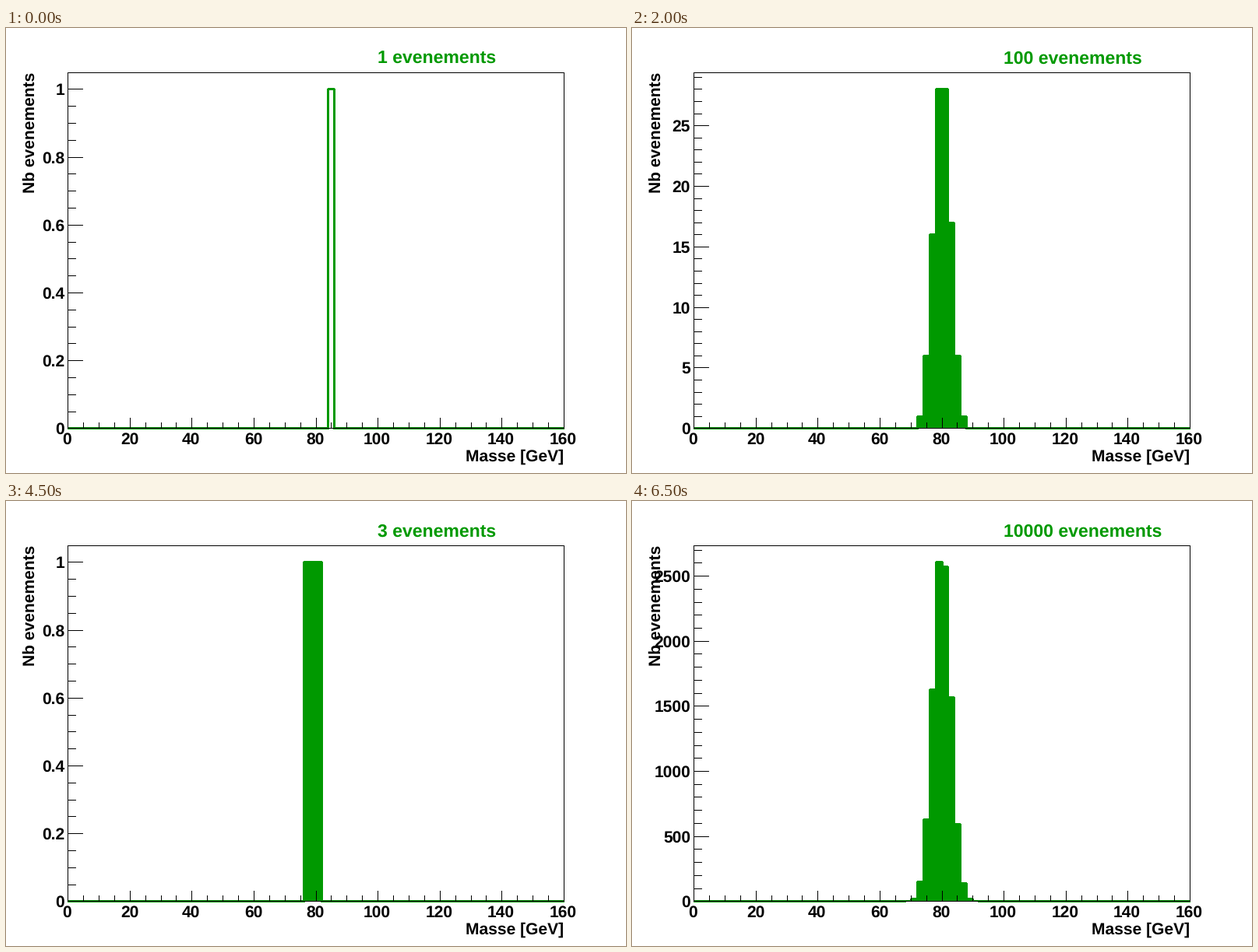
Recreate the animation shown at these times as a matplotlib script. Size 796 px wide and 572 px high, loop 7100 ms.

```python
import math

import matplotlib
import matplotlib.pyplot as plt
from matplotlib.animation import FuncAnimation
from matplotlib.collections import PolyCollection

matplotlib.rcParams["toolbar"] = "None"
matplotlib.rcParams["text.hinting"] = "no_hinting"

W, H, DPI = 796, 572, 100
X0, Y0 = 0.1 * W, 0.9 * H
PLOT_W, PLOT_H = 0.8 * W, 0.8 * H
LEFT, RIGHT, TOP, BOTTOM = 79, 716, 57, 514
X_MAX, BIN = 160, 2
GREEN = "#009900"
TICK_MS, HOLD = 100, 5
TOTALS = [1, 2, 3, 10, 100, 1000, 10000]

# Each run: its first three masses, then (peak, mean, sigma) as events pile up.
RUNS = [
    ((85, 77, 79), [(3, 80, 2.5), (28, 80.05, 2.8),
                    (268, 80.03, 2.88), (2660, 80.03, 2.88)]),
    ((79, 81, 77), [(4, 80.4, 2.0), (33, 80.5, 2.3),
                    (261, 80, 2.88), (2605, 79.95, 2.88)]),
]
CENTERS = range(BIN // 2, X_MAX, BIN)


def bell(peak, mean, sigma):
    g = [math.exp(-((c - mean) / sigma) ** 2 / 2) for c in CENTERS]
    return [round(peak * v / max(g)) for v in g]


def histograms():
    for masses, bells in RUNS:
        for n in range(1, len(masses) + 1):
            yield [masses[:n].count(c) for c in CENTERS]
        for params in bells:
            yield bell(*params)


STEPS = list(histograms())

fig = plt.figure(figsize=(W / DPI, H / DPI), dpi=DPI, facecolor="white")
ax = fig.add_axes([0, 0, 1, 1])
ax.set_xlim(0, W)
ax.set_ylim(H, 0)
ax.axis("off")


def rect(x0, y0, x1, y1):
    return [(x0, y0), (x1, y0), (x1, y1), (x0, y1)]


def layer(color, z, verts=()):
    coll = PolyCollection(list(verts), facecolors=color, edgecolors="none",
                          linewidths=0, antialiaseds=False, zorder=z)
    ax.add_collection(coll, autolim=False)
    return coll


def label(x, y, s="", size=21, color="black", **kw):
    return ax.text(x, y, s, family="Liberation Sans", weight="bold",
                   size=size * 72 / DPI, color=color, va="baseline",
                   zorder=5, **kw)


def px(v):
    return math.floor(X0 + v * PLOT_W / X_MAX + 1e-6)


def py(v, top):
    return math.floor(Y0 - v * PLOT_H / top + 1e-6)


def axis_step(top):
    """Smallest round step giving at most ten divisions, and its subdivisions."""
    power = 10.0 ** (math.floor(math.log10(top)) - 1)
    while True:
        for lead, parts in ((1, 5), (2, 4), (5, 5)):
            if top / (lead * power) <= 10:
                return lead * power, parts
        power *= 10


def y_axis(top):
    step, parts = axis_step(top)
    lines, marks = [], []
    for i in range(int(top / step * parts + 1e-9) + 1):
        v = i * step / parts
        y = py(v, top)
        major = i % parts == 0
        lines.append(rect(LEFT, y, LEFT + (20 if major else 11), y + 1))
        if major:
            marks.append((y, f"{v:g}"))
    return lines, marks


def outline(counts, top):
    """Bars, plus the thick zero line across the empty bins."""
    full, inner = [], []
    for c, n in zip(CENTERS, counts):
        a, b = px(c - BIN / 2), px(c + BIN / 2)
        x0, x1 = max(a - 1, LEFT), min(b + 2, RIGHT + 1)
        y = py(n, top)
        if n:
            full.append(rect(x0 + 1, y - 1, x1 - 1, y))
            full.append(rect(x0, y, x1, BOTTOM))
            inner.append(rect(a + 2, y + 2, b - 1, BOTTOM))
        else:
            full.append(rect(x0, BOTTOM - 1, x1, BOTTOM + 2))
    return full, inner


frame = [
    rect(LEFT, TOP, RIGHT + 1, TOP + 1),
    rect(LEFT, BOTTOM, RIGHT + 1, BOTTOM + 1),
    rect(LEFT, TOP, LEFT + 1, BOTTOM + 1),
    rect(RIGHT, TOP, RIGHT + 1, BOTTOM + 1),
]
for v in range(0, X_MAX + 1, 5):
    x = px(v)
    frame.append(rect(x, 501 if v % 20 == 0 else 507, x + 1, BOTTOM))
    if v % 20 == 0:
        label(x - 0.5, 535, str(v), ha="center")

green = layer(GREEN, 2)
hollow = layer("white", 3)
layer("black", 4, frame)
ticks = layer("black", 4)

label(716, 557, "Masse [GeV]", ha="right")
label(37, 57, "Nb evenements", ha="right", rotation=90,
      rotation_mode="anchor")
title = label(477, 46, size=23, color=GREEN, ha="left")
y_labels = [label(75, 0, ha="right") for _ in range(11)]


def draw(i):
    k = min(i // HOLD, len(STEPS) - 1)
    counts = STEPS[k]
    total = TOTALS[k % len(TOTALS)]
    top = 1.05 * max(counts)

    full, inner = outline(counts, top)
    green.set_verts(full)
    hollow.set_verts(inner if total == 1 else [])

    lines, marks = y_axis(top)
    ticks.set_verts(lines)
    for j, t in enumerate(y_labels):
        t.set_visible(j < len(marks))
        if j < len(marks):
            y, s = marks[j]
            t.set_y(y + 8)
            t.set_text(s)
    title.set_text(f"{total} evenements")
    return [green, hollow, ticks, title, *y_labels]


anim = FuncAnimation(fig, draw, frames=len(STEPS) * HOLD + 1,
                     interval=TICK_MS, repeat=True, repeat_delay=0,
                     init_func=lambda: draw(0), blit=False)
plt.show()
```
